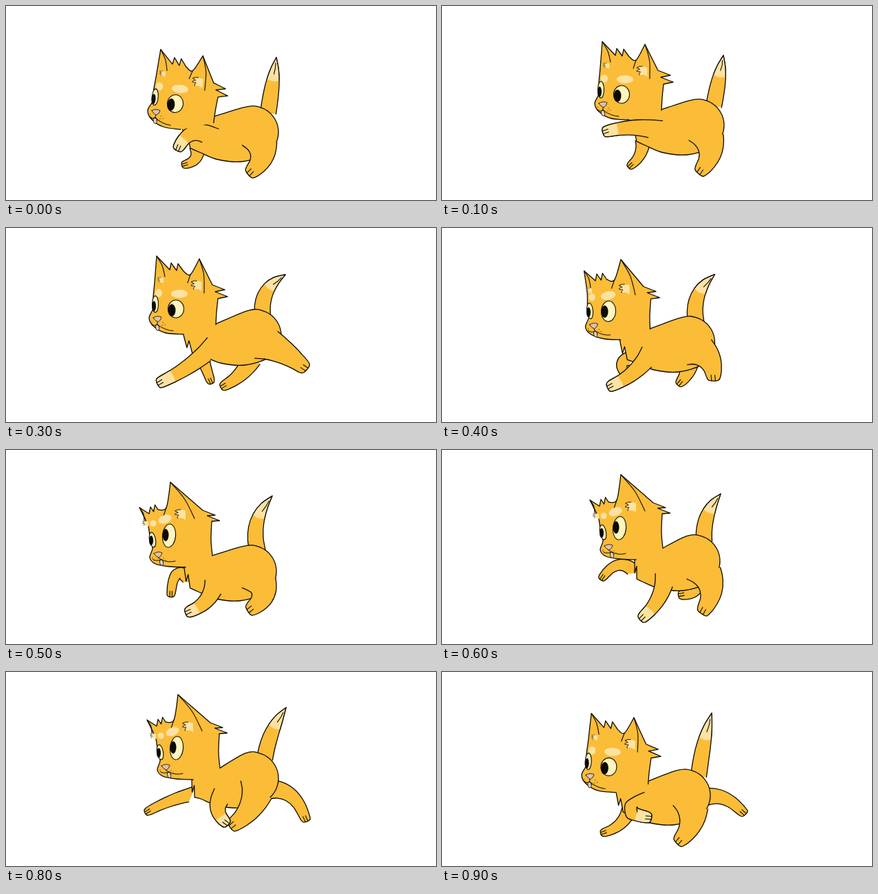
Recreate the animation shown at these times as an HTML page. Size 625 by 283 pixels, loop 1 s.

```html
<!DOCTYPE html>
<html lang="en">
<head>
<meta charset="utf-8">
<title>Running kitten</title>
<style>
html, body { margin: 0; width: 100%; height: 100%; overflow: hidden; background: #fff; }
svg { display: block; width: 100vw; height: 100vh; }
path, ellipse { stroke-linecap: round; stroke-linejoin: round; }
</style>
</head>
<body>
<svg id="stage" viewBox="0 0 625 283"></svg>
<script>
const FUR = '#fbbc38', CREAM = '#fee2a3', EYE = '#fff4bd', NOSE = '#e0bfae', TONGUE = '#dccbc4', INK = '#0c0a04';
const STEP = 100, LOOP = 1000;

// Key poses. head: muzzle x,y, tilt, lift (0 level, 1 looking up); rump: centre;
// tail: tip and bend; limbs: paw and bend.
const poses = [
  { head: '206,152,5,0', rump: '358,184', tail: '393,75,0',
    nearHind: '356,242,10', farHind: '372,212,0', nearFore: '251,206,-14', farFore: '261,231,7' },
  { head: '222,142,0,0', rump: '372,174', tail: '409,72,0',
    nearHind: '376,240,11', farHind: '385,208,0', nearFore: '239,183,-5', farFore: '275,232,5' },
  { head: '208,131,0,0', rump: '362,157', tail: '406,68,12',
    nearHind: '433,203,3', farHind: '317,230,7', nearFore: '225,225,4', farFore: '297,222,0' },
  { head: '209,157,0,1', rump: '355,177', tail: '387,67,12',
    nearHind: '356,232,13', farHind: '376,220,2', nearFore: '266,236,8', farFore: '240,209,-25' },
  { head: '230,146,0,1', rump: '366,162', tail: '405,64,8',
    nearHind: '380,234,13', farHind: '349,211,10', nearFore: '292,244,7', farFore: '234,185,-17' },
  { head: '220,143,0,1', rump: '358,155', tail: '407,52,5',
    nearHind: '330,223,8', farHind: '435,213,22', nearFore: '319,219,-9', farFore: '207,203,-3' },
  { head: '203,150,2,0', rump: '352,180', tail: '392,60,2',
    nearHind: '345,246,9', farHind: '437,204,22', nearFore: '299,212,-24', farFore: '236,234,6' }
].map(pose => {
  const out = {};
  for (const key in pose) out[key] = parse(pose[key])[0];
  return out;
});

// Head seen level and looking up, measured from the muzzle; "!" marks a corner.
const level = {
  outline: parse('50,24 24,22 6,12 0,0 6,-14 6,-30 8,-52 11,-90! 30,-70! 50,-68 60,-63 73,-86! 92,-48! 100,-28! 98,-8 97,10'),
  eyes: parse('9,-20,4.5,12,0 39,-13,11.5,13,0 7,-17,3,7.5,0 33,-11,5.5,9,0 14,-36,5,6,0 44,-35,12,6,0'),
  mouth: parse('12,2 12,14 35,19')
};
const raised = {
  outline: parse('52,14 28,13 8,9 0,0 4,-14 0,-32 -3,-48 -15,-73! -1,-64! 12,-70 24,-73 30,-110! 77,-69! 90,-53! 89,-25 91,-3'),
  eyes: parse('4,-26,4.5,11,-10 28,-32,9.5,17,5 2,-25,3,7,0 23,-33,4.5,9,0 5,-50,4.5,4.5,0 22,-56,10,6,-22'),
  mouth: parse('12,-4 17,7 37,5')
};

function parse(text) {
  return text.split(' ').map(token => {
    const p = token.split(',').map(parseFloat);
    p.hard = token.endsWith('!');
    return p;
  });
}

function mix(p, q, t) {
  const out = p.map((v, i) => v + (q[i] - v) * t);
  out.hard = p.hard;
  return out;
}

function between(a, b) {
  const out = {};
  for (const key in a) out[key] = mix(a[key], b[key], .5);
  return out;
}

const corner = p => Object.assign(p, { hard: true });
const add = (p, x, y) => [p[0] + x, p[1] + y];
const xy = p => p[0].toFixed(1) + ',' + p[1].toFixed(1);

// Smooth curve through the points from index a to index b.
function curve(pts, a = 0, b = pts.length - 1) {
  let d = 'M' + xy(pts[a]);
  for (let i = a; i < b; i++) {
    const p = pts[i], q = pts[i + 1];
    const before = p.hard ? p : pts[i - 1] || p;
    const after = q.hard ? q : pts[i + 2] || q;
    const c1 = [0, 1].map(k => p[k] + (q[k] - before[k]) / 6);
    const c2 = [0, 1].map(k => q[k] - (after[k] - p[k]) / 6);
    d += `C${xy(c1)} ${xy(c2)} ${xy(q)}`;
  }
  return d;
}

const draw = (d, fill = 'none', width = 1.3) =>
  `<path d="${d}" fill="${fill}" stroke="${width ? INK : 'none'}" stroke-width="${width}"/>`;
const line = (...pts) => draw(curve(pts), 'none', 1.1);
const oval = ([x, y, rx, ry, turn], fill, width = 0) =>
  `<ellipse rx="${rx}" ry="${ry}" transform="translate(${x} ${y}) rotate(${turn})" fill="${fill}" stroke="${width ? INK : 'none'}" stroke-width="${width}"/>`;

// Spiky hair from a to b.
function tuft(a, b, count, [dx, dy]) {
  const pts = [];
  for (let i = 0; i < count; i++) {
    pts.push(corner(add(mix(a, b, i / count), dx, dy)), corner(mix(a, b, (i + 1) / count)));
  }
  return pts;
}

// Both sides of a bent tube from a to b; width gives half the thickness at t.
function tube(a, b, bend, width, steps = 5) {
  const len = Math.hypot(b[0] - a[0], b[1] - a[1]) || 1;
  const mid = mix(a, b, .5);
  const knee = add(mid, 2 * bend * (b[1] - a[1]) / len, -2 * bend * (b[0] - a[0]) / len);
  const left = [], right = [];
  let dir;
  for (let i = 0; i <= steps; i++) {
    const t = i / steps, p = mix(a, knee, t), q = mix(knee, b, t), c = mix(p, q, t);
    const reach = Math.hypot(q[0] - p[0], q[1] - p[1]) || 1;
    dir = [(q[0] - p[0]) / reach, (q[1] - p[1]) / reach];
    const w = width(t);
    left.push(add(c, -dir[1] * w, dir[0] * w));
    right.unshift(add(c, dir[1] * w, -dir[0] * w));
  }
  return { left, right, dir };
}

// Pale end of a tail or paw, with a rounded inner edge.
function paleEnd(pts, a, b, far) {
  const mid = mix(pts[a], pts[b], .5);
  return draw(curve(pts, a, b), CREAM) +
    draw(`M${xy(pts[a])}Q${xy(mix(far, mid, 1.15))} ${xy(pts[b])}Z`, CREAM, 0);
}

function tail(rump, [x, y, bend]) {
  const tip = corner([x, y]), base = add(rump, 23 - bend, -28);
  const { left, right } = tube(base, tip, bend, t => 11.5 * (1 - t ** 3));
  const pts = [...left.slice(0, -1), tip, ...right.slice(1)];
  const root = mix(pts[3], pts[7], .5);
  return draw(curve(pts), FUR) + paleEnd(pts, 3, 7, tip) +
    line(mix(tip, root, .25), mix(mix(tip, root, .45), pts[4], .15), mix(tip, root, .75));
}

function limb(root, [x, y, bend], thick, thin, pale) {
  const paw = [x, y];
  const { left, right, dir } = tube(root, paw, bend, t => thick + (thin - thick) * t ** .8);
  const toe = (side, ahead) =>
    add(paw, dir[0] * ahead - dir[1] * thin * side, dir[1] * ahead + dir[0] * thin * side);
  const pts = [...left, toe(.6, 5), toe(-.6, 5), ...right];
  return draw(curve(pts, 0, pts.length - 2), FUR) + (pale ? paleEnd(pts, 4, 9, paw) : '') +
    line(toe(.25, 5), toe(.35, -3)) + line(toe(-.3, 5), toe(-.2, -3));
}

function body(rump, head, lift) {
  const neck = add(head, 97 - 6 * lift, 9 - 12 * lift);
  const chest = add(head, 50, 25 - 10 * lift), front = add(rump, -75, 30);
  const pts = [neck];
  for (let deg = -105; deg <= 60; deg += 33) {
    const a = deg * Math.PI / 180;
    pts.push(add(rump, 38 * Math.cos(a), 38 * Math.sin(a)));
  }
  pts.push(add(rump, -15, 43), add(rump, -50, 40), front,
    ...tuft(mix(front, chest, .45), chest, 2, [-3, 10]));
  const outline = curve(pts);
  return draw(`${outline}L${xy(add(head, 50, -20))}Z`, FUR, 0) + draw(outline);
}

function earFur([x, y], size) {
  return `<g transform="translate(${x} ${y}) scale(${size})">` +
    draw('M8,-6Q-2,-10-9,-6Q-5,-5-4,-3Q-9,-3-9,0Q-5,0-3,1Q-6,3-5,6Q3,4 8,9Z', CREAM, 0) +
    draw('M0,-8Q-5,-9-9,-6Q-5,-5-4,-3Q-9,-3-9,0Q-5,0-3,1Q-6,3-5,6', 'none', 1) + '</g>';
}

function face(eyes, [nose, tongue, smile]) {
  const [x, y] = nose, lip = add(tongue, 0, -4);
  const dots = [[-8, 4], [-6, 8], [8, 5], [11, 8], [7, 9]];
  const [farEye, nearEye, farPupil, nearPupil, ...brows] = eyes;
  return brows.map(b => oval(b, CREAM)).join('') +
    oval(farEye, EYE, 1.1) + oval(nearEye, EYE, 1.1) + oval(farPupil, INK) + oval(nearPupil, INK) +
    oval([...tongue, 2.6, 4.5, -10], TONGUE, .8) +
    draw(`M${x},${y + 4}L${xy(lip)}Q${x - 5},${lip[1] + 3} ${x - 8},${lip[1] - 1}`, 'none', 1) +
    draw(`M${xy(lip)}Q${xy(add(mix(lip, smile, .5), 0, 4))} ${xy(smile)}`, 'none', 1) +
    draw(`M${x - 6},${y - 2}Q${x},${y - 6} ${x + 6},${y - 3}Q${x + 5},${y + 2} ${x + 1},${y + 4}Q${x - 4},${y + 2} ${x - 6},${y - 2}Z`, NOSE, .8) +
    dots.map(([dx, dy]) => oval([x + dx, y + dy, .7, .7, 0], '#6b4510')).join('');
}

function head([x, y, tilt, lift]) {
  const view = key => level[key].map((p, i) => mix(p, raised[key][i], lift));
  const k = view('outline');
  const [farBase, farTip, farEnd, crown, nearBase, nearTip, nearEnd, hairEnd] = k.slice(6, 14);
  const outline = [...k.slice(0, 9), ...tuft(farEnd, crown, 2, [2, -10]),
    nearBase, nearTip, nearEnd, ...tuft(nearEnd, hairEnd, 2, [18, 7]), ...k.slice(14)];
  const farFold = add(farEnd, -7, 10), nearFold = add(nearEnd, -12, 12), low = add(nearBase, -4, 12);
  return `<g transform="translate(${x} ${y}) rotate(${tilt})">` + draw(curve(outline), FUR) +
    earFur(add(mix(farBase, farFold, .6), 0, 2), .5) + earFur(add(mix(low, nearFold, .55), 0, -4), .9) +
    line(farTip, add(mix(farTip, farFold, .5), 2, -1), farFold) +
    line(nearTip, add(mix(nearTip, nearFold, .5), 3, -2), nearFold) + line(nearBase, low) +
    face(view('eyes'), view('mouth')) + '</g>';
}

function kitten(p, dy = 0) {
  const { rump } = p, lift = p.head[3];
  return `<g transform="translate(0 ${dy})">` + tail(rump, p.tail) +
    limb(add(rump, 0, 22), p.farHind, 17, 7) +
    limb(add(rump, -80, 22), p.farFore, 11, 6) +
    body(rump, p.head, lift) +
    limb(add(rump, 10, 8), p.nearHind, 27, 10) +
    limb(add(p.head, 95, 40 - 4 * lift), p.nearFore, 15, 8, true) +
    head(p.head) + '</g>';
}

const [crouch, reach, stretch, land, rise, leap, gather] = poses;
const cycle = [
  kitten(crouch), kitten(reach), kitten(between(reach, stretch)), kitten(stretch),
  kitten(between(stretch, land)), kitten(land), kitten(rise),
  kitten(between(rise, leap), -6), kitten(leap), kitten(gather)
];

const stage = document.getElementById('stage');
const start = performance.now();
let shown = -1;

function update(now) {
  const step = Math.floor(Math.max(0, now - start) % LOOP / STEP);
  if (step !== shown) stage.innerHTML = cycle[shown = step];
  requestAnimationFrame(update);
}
update(start);
</script>
</body>
</html>
```
